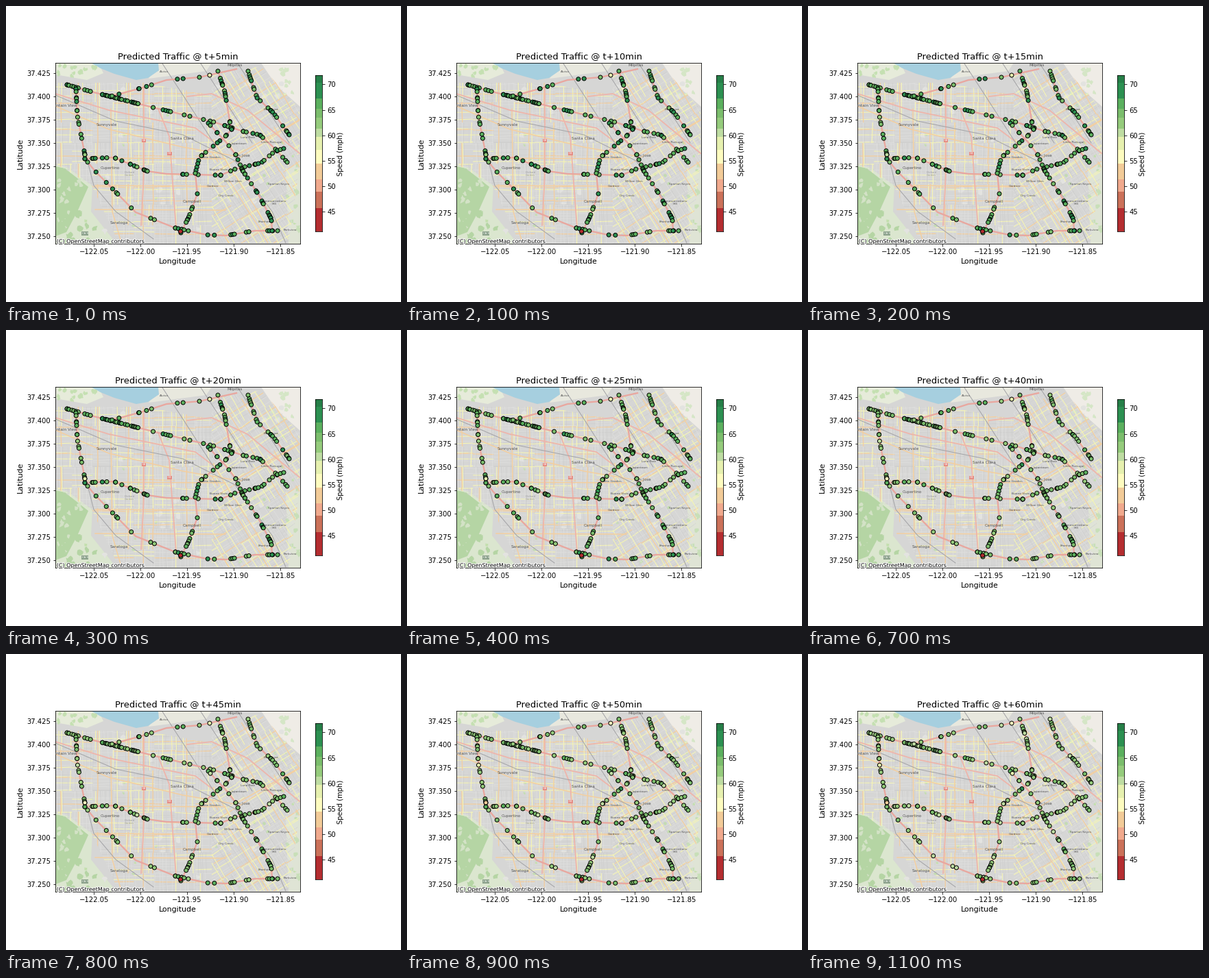
A matplotlib script that plays this animation: 576x432 px, repeating every 1.2 s.

```python
import matplotlib.pyplot as plt
import numpy as np
from matplotlib import patheffects
from matplotlib.animation import FuncAnimation
from matplotlib.collections import LineCollection
from matplotlib.colors import BoundaryNorm, ListedColormap
from matplotlib.path import Path

W, H, DPI = 576, 432, 72
STEPS, INTERVAL = 12, 100
V_LOW, V_HIGH = 41.1, 71.75
PX_PER_DEG = 1360

# Upper limit (mph) and colour of each band.
BANDS = [(45.7, "#b42d30"), (48.9, "#cb7159"), (51.4, "#f0a98d"), (54.4, "#f2cb98"),
         (57.1, "#fdfbbf"), (59.7, "#e6f0af"), (61.3, "#bedca2"), (63.4, "#95cb7c"),
         (65.2, "#7bbd6c"), (67.2, "#5bb05e"), (70.4, "#2c9051"), (V_HIGH, "#267f48")]
MOTORWAY, PRIMARY, EXPRESS = "#e9a79f", "#f4cf9f", "#eeb5ab"
YELLOW, RAIL, PARK = "#f6f5b4", "#a3a3a6", "#b5d5a4"

plt.rcParams.update({"font.family": "DejaVu Sans", "font.size": 10})
rng = np.random.default_rng(11)
fig = plt.figure(figsize=(W / DPI, H / DPI), dpi=DPI)


def place(left, top, right, bottom):
    return fig.add_axes([left / W, 1 - bottom / H, (right - left) / W, (bottom - top) / H])


# The map uses stage pixels as its coordinates.
ax = place(72, 83.4, 429.12, 347.4)
ax.set(xlim=(72, 429.12), ylim=(347.4, 83.4), facecolor="#d6d6d5")
lons = np.arange(-122.05, -121.84, 0.05)
lats = np.arange(37.25, 37.43, 0.025)
ax.set_xticks(128.1 + (lons + 122.05) * PX_PER_DEG, [f"{v:.2f}".replace("-", "\u2212") for v in lons])
ax.set_yticks(336.4 - (lats - 37.25) * PX_PER_DEG, [f"{v:.3f}" for v in lats])
ax.set_xlabel("Longitude", fontsize=11)
ax.set_ylabel("Latitude", fontsize=11)
title = ax.set_title("", fontsize=13)


def area(color, *pts):
    ax.fill(*zip(*pts), color=color, lw=0, zorder=0)


def way(color, lw, *pts):
    ax.plot(*zip(*pts), color=color, lw=lw, solid_joinstyle="round", zorder=2)


def blobs(color, count, left, top, right, bottom, size):
    a = np.arange(8) * np.pi / 4
    for _ in range(count):
        x, y = rng.uniform((left, top), (right, bottom))
        r = size * rng.uniform(0.4, 1.2, 8)
        area(color, *zip(x + r * np.cos(a), y + r * np.sin(a)))


def grid(zone, angle, gap, color, lw, keep):
    """Roughly parallel streets, broken at random, clipped to a zone."""
    center = np.mean(zone, axis=0)
    a = np.radians(angle)
    d, n = np.array([np.cos(a), np.sin(a)]), np.array([-np.sin(a), np.cos(a)])
    segs = []
    for off in np.arange(-260, 260, gap):
        off += rng.normal(0, gap * 0.25)
        for s in np.arange(-260, 260, 30):
            if rng.random() < keep:
                p = center + n * off + d * s
                segs.append([p, p + d * 30 + n * rng.normal(0, 0.8)])
    lines = LineCollection(segs, colors=color, linewidths=lw, zorder=1)
    ax.add_collection(lines, autolim=False)
    lines.set_clip_path(Path(zone + zone[:1]), ax.transData)


# Land, water and parks
area("#e6ebda", (72, 83), (135, 83), (142, 98), (118, 108), (72, 100))
area("#e8e8de", (222, 83), (300, 83), (292, 95), (208, 106))
area("#efece6", (372, 83), (430, 83), (430, 148), (394, 116))
area("#dfe4d5", (408, 240), (430, 225), (430, 348), (412, 348))
area("#a6cfdf", (124, 83), (222, 83), (223, 94), (207, 105), (190, 108), (158, 99), (138, 91))
area("#dbe6cf", (72, 232), (90, 236), (126, 262), (124, 300), (162, 348), (72, 348))
area(PARK, (72, 234), (86, 237), (120, 264), (104, 300), (88, 330), (72, 336))
blobs("#d3e2c6", 14, 76, 245, 110, 325, 4)
blobs(PARK, 16, 76, 300, 130, 346, 5)
blobs("#c5e0b2", 16, 75, 84, 132, 104, 3.5)
blobs("#c3dfae", 32, 100, 120, 425, 340, 2.6)
blobs("#d5e6c6", 14, 382, 88, 428, 130, 4)
blobs("#c8dfb8", 9, 410, 230, 428, 345, 4)
blobs("#e3e3e0", 30, 130, 110, 420, 340, 5)

# Street grids: square in the west, tilted in the east
west = [(72, 112), (200, 112), (300, 130), (300, 347), (165, 347), (125, 262), (72, 230)]
east = [(300, 100), (372, 88), (428, 150), (428, 235), (412, 346), (300, 346)]
for zone, tilt, bright in ((west, 0, 0.45), (east, -32, 0.6)):
    for angle in (tilt, tilt + 90):
        grid(zone, angle, 4.5, "#e1e1e0", 0.6, 0.6)
        grid(zone, angle, 5.5, "#c8c8c8", 0.4, 0.4)
        grid(zone, angle, 11, YELLOW, 1.1, bright)
        grid(zone, angle, 33, PRIMARY, 1.3, 0.7)

# Main roads and rail lines
for y in (222, 262, 297):
    way(PRIMARY, 1.5, (130, y), (320, y + 1))
way(PRIMARY, 1.5, (153, 150), (155, 300), (168, 345))
way(PRIMARY, 1.5, (72, 146), (150, 180), (258, 206), (334, 219), (428, 166))
way(EXPRESS, 1.8, (72, 128), (150, 152), (276, 178), (300, 196))
way(EXPRESS, 1.8, (201, 122), (201, 245), (197, 320))
way(EXPRESS, 1.8, (222, 150), (238, 190), (248, 324))
way(EXPRESS, 1.8, (264, 132), (300, 128), (352, 152), (428, 215))
for x in (228, 284, 338):
    way(RAIL, 1, (x, 84), (x + 30, 130), (x + 75, 200))
way(RAIL, 1, (72, 130), (160, 168), (258, 188), (334, 226), (388, 300), (408, 346))
way(RAIL, 1, (118, 223), (128, 262), (160, 300), (215, 340))

dots = []


def route(count, *path):
    """A motorway with sensors in loose clusters along it."""
    way(MOTORWAY, 2.3, *path)
    x, y = np.array(path).T
    dist = np.r_[0, np.hypot(np.diff(x), np.diff(y)).cumsum()]
    at = rng.gamma(1.2, size=count).cumsum()
    at = (at - at[0]) / (at[-1] - at[0]) * dist[-1]
    dots.extend(zip(np.interp(at, dist, x), np.interp(at, dist, y)))


route(48, (89, 115), (128, 126), (214, 148), (302, 169), (346, 183))
route(12, (346, 183), (370, 188), (393, 209), (410, 228))
route(16, (102, 121), (104, 160), (115, 217))
route(11, (115, 223), (130, 241), (189, 301), (247, 324))
route(17, (247, 324), (293, 334), (321, 335), (363, 328), (396, 328))
route(10, (152, 132), (200, 119), (234, 108), (282, 104))
route(23, (115, 223), (157, 221), (206, 241), (234, 245), (313, 247))
route(17, (313, 247), (334, 238), (372, 229), (392, 212), (405, 208))
route(15, (309, 95), (319, 125), (328, 178))
route(15, (329, 180), (320, 190), (282, 221), (276, 244))
route(9, (279, 274), (267, 307), (255, 331))
route(21, (353, 95), (366, 134), (390, 156), (413, 188))
route(24, (335, 217), (345, 240), (368, 275), (387, 311), (388, 328))
route(6, (295, 171), (322, 200), (335, 217))
way(MOTORWAY, 2.3, (276, 244), (279, 274))
way(MOTORWAY, 2.3, (282, 104), (336, 92))

# Speeds ease down over the hour; three sensors sit on slow spots.
n = len(dots)
start = rng.normal(67, 1.2, n)
end = start - rng.normal(4.3, 0.8, n)
slow = np.array([(254.5, 329, 44, 41.6), (297, 101, 57.5, 57), (115, 217, 62.5, 52)])
pos = np.vstack([dots, slow[:, :2]])
start, end = np.r_[start, slow[:, 2]], np.r_[end, slow[:, 3]]


def label(x, y, name, size, color="#555555", **kw):
    ax.text(x, y, name, size=size, color=color, ha="center", va="center", clip_on=True, zorder=3, **kw)


for x, y, name in ((147, 174, "Sunnyvale"), (257, 194, "Santa Clara"), (343, 219, "San Jose"),
                   (152, 237, "Cupertino"), (165, 317, "Saratoga"), (271, 286, "Campbell"),
                   (334, 87, "Milpitas"), (82, 146, "Mountain View")):
    label(x, y, name, 5.8)
for x, y, name in ((310, 239, "Buena Vista"), (331, 256, "Willow Glen"), (321, 277, "Dry Creek"),
                   (302, 263, "Gardner"), (340, 201, "Japantown"), (352, 192, "Luna Park"),
                   (299, 221, "Rose Garden"), (386, 151, "Berryessa"), (387, 199, "Little Portugal"),
                   (398, 260, "Spartan Keyes"), (391, 287, "Communications\nHill"),
                   (377, 315, "Branham"), (414, 327, "Parkview"), (230, 96, "Alviso")):
    label(x, y, name, 4.4)
label(180, 245, "Orchard\nGarden", 3.8, "#9a9aa0")
for x, y, name, fill in ((201, 196.5, "G2", "#e58d84"), (238.5, 215.5, "G4", "#e58d84"), (115, 332, "CA 9", "#8aa08a")):
    label(x, y, name, 3.8, "white", bbox=dict(boxstyle="square,pad=0.2", fc=fill, lw=0))
ax.text(0.005, 0.005, "(C) OpenStreetMap contributors", transform=ax.transAxes, size=8, zorder=6,
        path_effects=[patheffects.withStroke(linewidth=2, foreground="w")])

# Colour scale
limits, colors = zip(*BANDS)
cmap, norm = ListedColormap(colors), BoundaryNorm([V_LOW, *limits], len(colors))


def shade(v):
    return cmap(norm(np.clip(v, V_LOW, V_HIGH - 0.01)))


cax = place(451.4, 101.4, 461.4, 329.4)
cax.imshow(shade(np.linspace(V_LOW, V_HIGH, 456))[:, None], extent=(0, 1, V_LOW, V_HIGH),
           origin="lower", aspect="auto", interpolation="nearest")
cax.set_xticks([])
cax.yaxis.tick_right()
cax.yaxis.set_label_position("right")
cax.set_yticks(range(45, 71, 5))
cax.set_ylabel("Speed (mph)", labelpad=2)

marks = ax.scatter(*pos.T, s=35, edgecolors="black", linewidths=1, zorder=5)


def update(k):
    title.set_text(f"Predicted Traffic @ t+{5 * (k + 1)}min")
    marks.set_facecolors(shade(start + (end - start) * k / (STEPS - 1)))
    return title, marks


anim = FuncAnimation(fig, update, frames=STEPS, interval=INTERVAL, repeat=True, repeat_delay=0)
plt.show()
```
